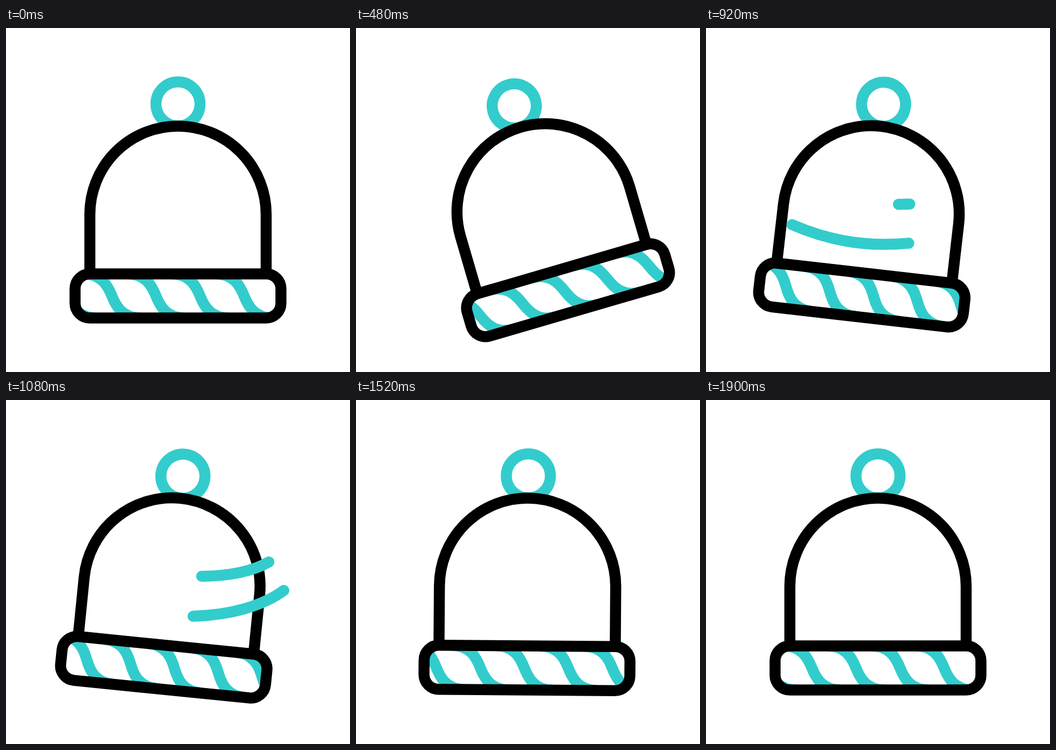
These frames come from a looping animation (640 by 640 pixels, 2.4 s). An HTML page:

```html
<!DOCTYPE html>
<html lang="en">
<head>
<meta charset="utf-8">
<title>Swinging hat</title>
<style>
  html, body { margin: 0; height: 100%; overflow: hidden; background: #fff; }
  svg { display: block; width: 100%; height: 100%; }
  .teal { stroke: #3cc; }
</style>
</head>
<body>
<svg viewBox="0 0 640 640" fill="none" stroke="#000" stroke-width="20.5">
  <defs>
    <clipPath id="band"><rect x="128.5" y="457.5" width="383" height="82" rx="27.5"/></clipPath>
    <path id="stripe" d="M-53-41C-20-41-8-20 0 0S20 41 53 41"/>
  </defs>
  <g id="hat">
    <circle class="teal" cx="320" cy="141.2" r="41"/>
    <path d="M156 457V346.500a164 164 0 0 1 328 0V457"/>
    <g clip-path="url(#band)"><g id="stripes" class="teal"></g></g>
    <rect x="128.500" y="457.500" width="383" height="82" rx="27.500"/>
  </g>
  <g class="teal" stroke-linecap="round">
    <path id="low" pathLength="1" d="M96 332C140 360 225 402.500 330 402.500C425 402.500 500 378 538 335"/>
    <path id="high" pathLength="1" d="M358 328C430 328 499 312 524 268"/>
  </g>
</svg>
<script>
const LOOP = 2400;
const el = id => document.getElementById(id);

// [time, angle] turning points of the damped swing
const swing = [[0, 0], [582, -17.7], [978, 8], [1360, -5], [1600, 2.3], [1900, 0]];

for (let i = -1; i < 4; i++)
  el('stripes').innerHTML += `<use href="#stripe" x="${197 + 82 * i}" y="498.5"/>`;

const ramp = (t, from, to) => Math.min(1, Math.max(0, (t - from) / (to - from)));
const ease = (t, from, to) => {
  const u = ramp(t, from, to);
  return u * u * (3 - 2 * u);
};

function angleAt(t) {
  let angle = 0;
  for (let i = 1; i < swing.length; i++) {
    const [t0, a0] = swing[i - 1], [t1, a1] = swing[i];
    angle += (a1 - a0) * ease(t, t0, t1);
  }
  return angle;
}

// Shows the part of a line between its eased tail and head.
function trim(line, tail, head) {
  const length = head - tail;
  line.style.visibility = length > 0.001 ? 'visible' : 'hidden';
  line.setAttribute('stroke-dasharray', `${length} 3`);
  line.setAttribute('stroke-dashoffset', -tail);
}

function draw(now) {
  const t = now % LOOP;
  const slide = 63 * ease(t, 30, 870) * Math.cos(ramp(t, 920, 1900) * Math.PI / 2);
  el('hat').setAttribute('transform', `rotate(${angleAt(t)} 320 232.7)`);
  el('stripes').setAttribute('transform', `translate(${slide})`);
  trim(el('low'), ease(t, 785, 1330), ease(t, 570, 1170));
  trim(el('high'), ease(t, 1040, 1410), ease(t, 845, 1200));
}

let start;
function tick(now) {
  start ??= now;
  draw(now - start);
  requestAnimationFrame(tick);
}
draw(0);
requestAnimationFrame(tick);
</script>
</body>
</html>
```
